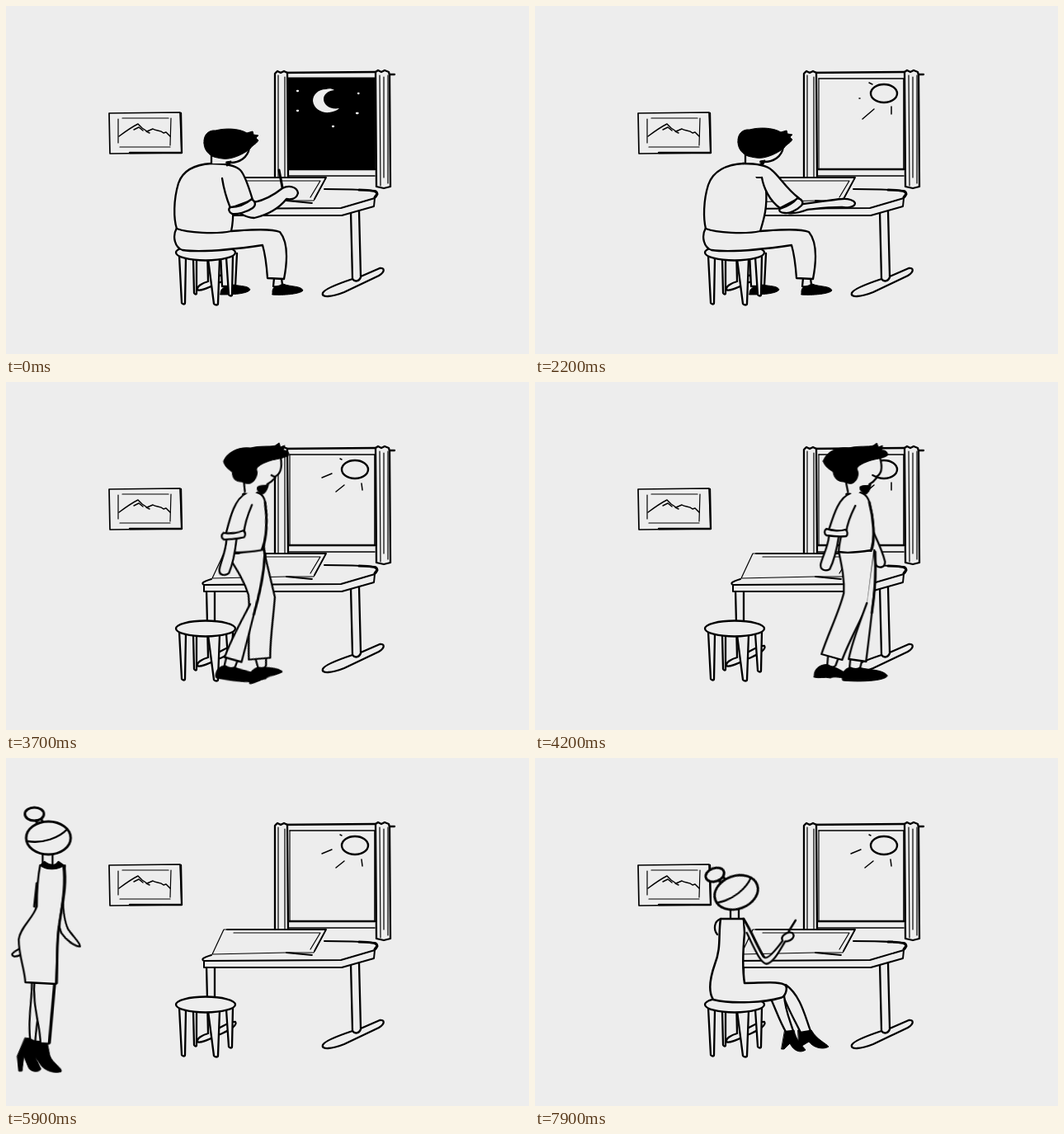
Write an HTML page without scripts that moves like this. It is 634 by 422 pixels and loops after 8 s.

```html
<!DOCTYPE html>
<html lang="en">
<head>
<meta charset="utf-8">
<title>Desk by the window</title>
<style>
html,body{margin:0;width:100%;height:100%;overflow:hidden;background:#ededed}
svg{display:block;width:634px;height:422px}
path,ellipse{fill:#ededed;stroke:#000;stroke-width:2.3;stroke-linecap:round;stroke-linejoin:round}
.n{fill:none}
.t{fill:none;stroke-width:1.2}
.b{stroke-width:3}
.k{fill:#000;stroke-width:1}

/* who is on stage */
.seated,.walker,.visitor,.artist,.night,.day,.pen,.back{animation:8s step-end infinite}
.seated{animation-name:seated}
.walker{animation-name:walker}
.visitor{animation-name:visitor}
.artist{animation-name:artist}
.night{animation-name:night}
.day{animation-name:day}
.back{animation-name:back}
@keyframes seated{0%{visibility:visible}42.5%,100%{visibility:hidden}}
@keyframes walker{0%{visibility:hidden}42.5%{visibility:visible}67%,100%{visibility:hidden}}
@keyframes visitor{0%{visibility:hidden}67.5%{visibility:visible}95%,100%{visibility:hidden}}
@keyframes artist{0%{visibility:hidden}95%,100%{visibility:visible}}
@keyframes night{0%{visibility:visible}6.2%,100%{visibility:hidden}}
@keyframes day{0%{visibility:hidden}6.2%,100%{visibility:visible}}
@keyframes back{0%{visibility:hidden}29.9%{visibility:visible}42.5%,100%{visibility:hidden}}

/* sky */
.moon{animation:moonset 8s linear infinite}
@keyframes moonset{0%,1.2%{transform:none}6.2%,100%{transform:translate(-14px,40px)}}
.sun{animation:sunrise 8s ease-out infinite}
@keyframes sunrise{0%,6.2%{transform:translate(-24px,70px)}11.2%,100%{transform:none}}
.rays{animation:rays 1s step-end infinite}
@keyframes rays{
0%,69%,100%{d:path("M383 116L395 111M400 133L410 125M405 93L407 94M431 123L432 131")}
9.5%{d:path("M392 112L397 111M395 137L411 125M402 93L407 94M432 124L433 129")}
19.5%{d:path("M393 112L394 112M397 137L411 125M405 93L409 95M432 122L432 131")}
40%{d:path("M388 114L396 111M400 133L410 125M405 92L408 94M431 123L432 130")}
}

/* seated man */
.head,.torso,.sleeve,.cuff,.fore,.arm2,.fold{animation:8s ease-in-out infinite}
.head{animation-name:head}
@keyframes head{
0%,2%{transform:none}
10%,27.5%{transform:translate(6px,-1px)}
32%,35%{transform:translate(-3px,-3px)}
38.75%,100%{transform:translate(-8px,0)}
}
.torso{animation-name:torso}
@keyframes torso{
0%,2%{d:path("M249 191C232 192 215 197 209 215C203 235 203 258 207 270C220 275 255 277 273 273C276 260 277 235 270 203")}
10%,27.5%{d:path("M253 191C234 192 216 199 210 217C204 236 204 258 207 270C220 275 255 277 273 273C277 260 282 245 280 222")}
32%,100%{d:path("M241 191C228 194 216 198 212 208C208 232 206 255 207 270C220 275 255 277 276 272C279 255 278 235 277 207")}
}
.sleeve{animation-name:sleeve}
@keyframes sleeve{
0%,2%,14%,20%{d:path("M262 209C264 222 268 235 272 245L299 235C295 222 290 205 284 199C278 193 265 191 249 191")}
10%,11.25%,17%,23.75%,27.5%{d:path("M275 208C277 220 284 236 297 245L320 233C305 222 296 206 287 199C281 193 268 191 252 191")}
32%,35%{d:path("M276 215C290 200 300 180 304 152L284 148C283 165 280 175 274 183C270 188 262 190 245 191")}
38.75%,100%{d:path("M278 208C290 212 302 220 312 226L321 211C312 208 303 205 297 202C287 196 268 191 242 191")}
}
.cuff{animation-name:cuff}
@keyframes cuff{
0%,2%,14%,20%{d:path("M272 244C282 244 292 239 298 234C303 238 303 242 299 245C292 250 280 253 274 252C270 250 269 246 272 244Z")}
10%,11.25%,17%,23.75%,27.5%{d:path("M297 246C306 243 314 238 318 233C324 234 326 239 323 242C317 248 308 252 303 251C297 251 295 248 297 246Z")}
32%,35%{d:path("M304 152C298 154 290 152 284 149C281 146 281 141 285 140C292 139 300 141 305 143C309 146 308 151 304 152Z")}
38.75%,100%{d:path("M312 226C316 222 320 214 319 210C323 209 327 212 326 216C325 222 322 226 320 227C316 229 312 228 312 226Z")}
}
.fore{animation-name:fore}
@keyframes fore{
0%,2%,14%,20%{d:path("M301 238C315 235 325 229 335 221C343 217 353 219 354 227C352 234 346 235 340 234C332 244 318 253 301 257C295 257 288 254 283 251")}
10%,11.25%,17%,23.75%,27.5%{d:path("M325 240C345 238 358 235 372 234C380 233 387 236 388 239C388 244 378 245 372 244C355 244 340 246 330 247C322 250 314 252 307 251")}
32%,35%{d:path("M287 141C283 120 279 105 277 92C272 84 272 72 278 71C285 72 288 80 287 90C292 105 298 120 300 130C301 135 302 138 302 142")}
38.75%,100%{d:path("M324 212C328 210 331 206 334 203C340 200 354 199 357 203C356 207 350 207 345 209C340 212 334 218 330 221C327 224 324 226 320 227")}
}
.arm2{animation-name:arm2}
@keyframes arm2{
0%,29.9%{d:path("M241 191C228 190 216 194 211 199C205 203 202 208 203 214C205 222 206 226 207 232")}
32%,35%{d:path("M241 191C232 185 228 165 229 142C230 115 232 72 222 72C212 74 208 160 207 222")}
38.75%,100%{d:path("M241 191C225 193 208 194 196 199C186 201 182 207 187 212C193 217 203 217 211 213")}
}
.fold{animation-name:fold}
@keyframes fold{
0%,29.9%{d:path("M212 210C211 214 211 218 210 222")}
32%,35%{d:path("M229 142C222 147 216 146 211 143")}
38.75%,100%{d:path("M187 207C194 211 204 209 213 206")}
}
.pen{animation-name:pen;animation-timing-function:ease-in-out}
@keyframes pen{
0%,2%,14%,20%{transform:none;visibility:visible}
10%,11.25%,17%{transform:translate(26px,10px)}
23.7%{transform:translate(26px,10px);visibility:visible}
23.8%,100%{transform:translate(26px,10px);visibility:hidden}
}

/* walking man */
.stroll{animation:stroll 8s linear infinite}
@keyframes stroll{
0%,42.5%{transform:translate(-108px,2px)}
46.25%{transform:translate(-98px,0)}
52.5%{transform:none}
62.5%{transform:translate(270px,0)}
67%,100%{transform:translate(390px,0)}
}
.legA,.legB,.swingA,.swingB,.lean{animation:1.6s ease-in-out -.6s infinite}
.legA,.legB,.lean{transform-origin:388px 208px}
.legA{animation-name:stepA}
.legB{animation-name:stepB}
.lean{animation-name:lean}
.swingA{transform-origin:381px 142px;animation-name:swingA}
.swingB{transform-origin:402px 150px;animation-name:swingB}
@keyframes stepA{25%{transform:rotate(-26deg)}50%{transform:rotate(4deg)}75%{transform:rotate(-24deg)}}
@keyframes stepB{25%{transform:rotate(14deg)}50%{transform:rotate(-22deg)}75%{transform:rotate(12deg)}}
@keyframes lean{50%{transform:skewX(-9deg)}}
@keyframes swingA{25%,75%{transform:rotate(-12deg)}50%{transform:rotate(10deg) scale(1.18)}}
@keyframes swingB{25%,75%{transform:rotate(12deg)}50%{transform:rotate(-14deg)}}

/* visitor */
.enter{animation:enter 8s linear infinite}
@keyframes enter{
0%,68%{transform:translate(-275px,0)}
78.75%,91.25%{transform:none}
95%,100%{transform:translate(42px,0)}
}
.paceA,.paceB{animation:paceA 8s ease-in-out infinite;transform-origin:172px 255px}
.paceB{animation-name:paceB}
@keyframes paceA{0%,68%,73%,78%,91.25%,100%{transform:none}70.5%,75.5%{transform:rotate(-17deg)}93%{transform:rotate(-9deg)}}
@keyframes paceB{0%,68%,73%,78%,91.25%,100%{transform:none}70.5%,75.5%{transform:rotate(15deg)}93%{transform:rotate(7deg)}}
.armL{animation:armL 8s ease-in-out infinite;transform-origin:170px 132px}
.armR{animation:armR 8s ease-in-out infinite;transform-origin:198px 132px}
@keyframes armL{0%,75%{transform:rotate(-26deg)}78.75%,84%,91%{transform:none}81%,87.5%{transform:rotate(4deg)}95%,100%{transform:rotate(-20deg)}}
@keyframes armR{0%,75%{transform:rotate(30deg)}78.75%,84%,91%{transform:none}81%,87.5%{transform:rotate(-5deg)}95%,100%{transform:rotate(10deg)}}
.nod{animation:nod 8s ease-in-out infinite;transform-origin:178px 122px}
@keyframes nod{0%,79%,84%,91%,100%{transform:none}81.5%,87.5%{transform:rotate(3deg)}}
.sketch{animation:sketch .4s ease-in-out -.3s infinite;transform-origin:254px 200px}
@keyframes sketch{50%{transform:rotate(-3deg)}}
</style>
</head>
<body>
<svg viewBox="0 0 634 422" xmlns="http://www.w3.org/2000/svg">
<defs>
<clipPath id="pane"><path d="M343 88H447V198H343Z"/></clipPath>
<g id="face">
<ellipse cx="162" cy="68" rx="11.5" ry="8" class="b"/>
<path class="n b" d="M164 76L166 80M171 75L172 79"/>
<ellipse cx="179" cy="97" rx="27" ry="20" class="b"/>
<path class="n" d="M154 101C172 104 192 97 202 86"/>
</g>
</defs>

<!-- picture -->
<path style="stroke-width:1.7" d="M125 130L211 129L213 178L126 179Z"/>
<path class="n" d="M212 130L213 178L150 178"/>
<path class="t" d="M136 137V166M141 136H197M200 136L199 169M138 171H199"/>
<path class="n" style="stroke-width:1.5" d="M137 158C145 152 154 146 160 143L165 148L171 152L178 149C182 152 187 150 191 154L194 153L199 158M155 150L161 147L166 151M170 152L174 154"/>

<!-- window -->
<path class="n" d="M327 81L448 80"/>
<path class="n" style="stroke-width:1.6" d="M344 88H447V197"/>
<g class="night">
<path class="k" d="M341 87H447V198H341Z"/>
<g clip-path="url(#pane)"><path class="moon" style="stroke:none" d="M388 101C378 101 372 108 372 115C373 125 383 130 392 129C397 128 401 127 404 124C393 126 385 120 385 113C385 107 390 103 398 102C395 100 391 100 388 101Z"/></g>
<path d="M353 103h1M427 106h.5M353 127h1M425 130h1.5M396 146h1" style="stroke:#ededed"/>
</g>
<g class="day">
<path class="t" d="M344 88V197"/>
<g clip-path="url(#pane)"><ellipse class="sun" cx="423" cy="106" rx="16" ry="11" style="stroke-width:2.4"/></g>
<path class="rays n" style="stroke-width:1.5" d="M383 116L395 111M400 133L410 125M405 93L407 94M431 123L432 131"/>
</g>
<path class="n" style="stroke-width:2.6" d="M342 198H447"/>
<path class="n" style="stroke-width:1.6" d="M342 206H447"/>
<path d="M326 210V82L329 79L333 81L337 79L341 81L342 208"/>
<path class="t" d="M330 84V207M338 86V207"/>
<path d="M448 80L451 78L455 80L459 78L464 80L465 84L466 219L458 221L449 219Z"/>
<path class="t" d="M453 84L454 218M458 86V208M463 84V215"/>
<path class="n" d="M465 83H471"/>

<!-- table -->
<path d="M243 252L245 334C238 336 231 340 232 344C236 347 250 339 262 334C271 330 281 324 278 320C272 319 262 326 253 330L253 252"/>
<path d="M418 250L420 331C405 336 386 343 384 348C382 354 395 353 410 347L452 327C460 322 459 317 453 318L430 328L428 249"/>
<path class="n" d="M420 331C423 335 428 334 430 329"/>
<path d="M239 245L240 254L407 254L447 243L450 226L446 224L370 222L250 238L238 243Z" style="stroke:none"/>
<path class="n" style="stroke-width:2" d="M240 246V254H407L446 243L447 233M386 222C410 222 435 223 447 224C451 225 451 229 447 233L406 245L240 246C236 244 239 242 249 239"/>
<path class="n b" d="M428 223C440 223 450 224 450 228L447 232"/>
<path class="t" style="fill:#ededed" d="M264 208H388L373 236L340 236L250 238Z"/>
<path class="n" style="stroke-width:1.8" d="M268 208H388L374 234M340 236L371 239"/>
<path class="t" d="M276 212H381L369 232"/>

<!-- far shin, stool -->
<g class="seated">
<path d="M260 300L262 340H278L280 300"/>
<path class="k" d="M260 348C260 340 270 340 276 338C284 340 294 339 296 344C292 350 268 350 260 350Z"/>
</g>
<path d="M227 307L228 348C229 350 231 350 231 348V307"/>
<path d="M267 305L270 350C271 352 274 352 274 350L275 302"/>
<path d="M210 303L213 360C214 362 217 362 217 360L218 306"/>
<path d="M245 307L252 361C253 363 257 363 257 361L259 306"/>
<ellipse cx="242" cy="299" rx="36" ry="9.5"/>

<!-- seated man -->
<g class="seated">
<path class="k" d="M323 348C322 339 330 339 336 337C345 341 358 339 360 345C356 350 330 351 323 350Z"/>
<path d="M325 330L324 340C328 341 332 340 335 338L334 330"/>
<path d="M207 269C201 280 205 293 214 296C235 299 270 296 311 290C314 300 316 316 317 330L337 331C342 305 341 285 332 274C320 269 290 272 273 273"/>
<path class="torso" d="M249 191C232 192 215 197 209 215C203 235 203 258 207 270C220 275 255 277 273 273C276 260 277 235 270 203"/>
</g>
<g class="back">
<path class="arm2"/>
<path class="fold n"/>
</g>
<g class="seated">
<path class="fore"/>
<path class="sleeve"/>
<path class="cuff"/>
<g class="head">
<path d="M249 178V191L268 191L272 190C283 190 293 184 295 173" style="stroke:none"/>
<path class="n" d="M249 178V191M272 190C283 190 293 184 295 172"/>
<path class="k" d="M267 189L273 188L271 193L268 194Z"/>
<path class="k" d="M240 166C239 156 246 150 254 151C265 148 282 148 292 154L299 152L300 156L306 157L303 160L306 163C303 168 298 169 296 173C288 180 272 187 262 185C254 184 248 182 247 180C243 177 240 172 240 166Z"/>
</g>
</g>
<path class="pen n b" d="M331 199L335 220"/>

<!-- walking man -->
<g class="walker"><g class="stroll">
<g class="lean"><path class="swingB" d="M409 180C416 195 421 205 424 218C424 226 416 226 413 222C410 215 408 208 405 200"/></g>
<g class="legA">
<path class="k" d="M338 356C338 346 348 341 357 343C367 348 378 352 380 358C372 360 362 356 358 359C350 357 345 360 338 358Z"/>
<path d="M355 331L354 343C358 346 362 346 364 344L367 336"/>
<path d="M368 206C372 225 375 240 374 256C368 280 355 305 347 330L372 337C380 315 393 292 403 270L411 206"/>
</g>
<g class="legB">
<path class="k" d="M372 360C371 348 380 345 390 345C400 350 420 347 427 356C425 363 390 364 373 362Z"/>
<path d="M382 336L381 346C386 349 392 349 394 346L396 338"/>
<path d="M402 268C394 290 384 315 380 336L401 339C404 315 407 290 410 262C413 245 413 225 411 204"/>
<path class="n b" d="M412 206C413 230 412 255 408 280"/>
</g>
<g class="lean">
<path d="M377 136L383 133C398 132 404 138 406 150C411 170 411 190 407 204C395 206 380 208 368 206C368 196 371 188 372 180"/>
<path class="n b" d="M405 146C410 165 412 190 408 203"/>
<g class="swingA">
<path d="M356 187C355 200 348 212 346 221C345 228 352 230 357 227C363 215 366 200 368 187"/>
<path d="M382 135C368 140 362 160 356 179L377 182C378 172 384 158 388 150"/>
<path d="M353 178C360 181 370 181 376 179C379 181 379 185 377 187C369 188 360 187 353 186C350 184 350 180 353 178Z"/>
</g>
<path d="M376 118L378 134L391 136L398 128C406 126 412 122 414 116C420 112 421 103 418 92L385 95Z" style="stroke:none"/>
<path class="n" d="M376 118L379 133M418 92C421 103 420 112 413 115L409 113M414 116C411 120 409 122 405 124"/>
<path class="k" d="M394 127C398 124 402 127 407 124C406 131 403 137 399 136C396 133 392 131 394 127Z"/>
<path class="k" d="M349 96C352 86 364 78 380 80C392 77 404 79 410 77L414 74L416 79L421 77L420 83C425 82 428 86 427 89C422 93 412 93 404 96C396 99 390 102 390 106C393 110 391 119 386 122C382 125 377 122 374 121C366 121 362 116 361 109C357 106 351 103 349 96Z"/>
</g>
</g></g>

<!-- visitor -->
<g class="visitor"><g class="enter">
<g class="paceA">
<path class="k" d="M146 338L157 340L158 365L163 377C160 381 150 380 148 374L143 360L140 378H136L135 360Z"/>
<path d="M158 268C158 290 150 315 152 340L158 344C160 320 168 300 168 268"/>
</g>
<g class="paceB">
<path class="k" d="M160 343L182 344L186 360C190 370 202 374 201 379C195 382 180 380 174 370L168 362L166 378H164L162 358Z"/>
<path d="M163 268C161 300 173 325 174 346L184 346L187 268"/>
<path class="n b" d="M188 268L185 345"/>
</g>
<path d="M172 114V130H184V114"/>
<path class="armL" d="M170 131C160 145 140 185 118 207C110 212 96 208 92 212C90 218 105 218 112 216C125 208 145 192 153 178C160 165 165 155 168 145"/>
<path class="armR" d="M198 130C205 150 225 185 240 195C250 200 262 202 263 206C258 209 245 208 235 203C222 192 210 175 198 152"/>
<path d="M169 130C166 145 165 160 165 180C160 195 145 205 143 220C143 240 150 255 151 272L188 274C190 240 189 220 192 203C195 180 200 155 197 131"/>
<path class="n b" d="M189 273C190 240 189 220 192 203C195 180 202 155 198 131M165 152L162 180"/>
<path class="k" d="M169 130L174 125C182 131 187 131 191 125L198 130C192 136 175 137 169 130Z"/>
<use class="nod" href="#face"/>
</g></g>

<!-- seated artist -->
<g class="artist">
<path class="k" d="M303 330L314 330C316 342 325 350 328 354C322 358 314 356 309 346L302 353H299Z"/>
<path class="k" d="M319 330L335 330C342 342 353 346 356 350C350 354 338 352 332 344L322 350L320 349Z"/>
<path d="M298 280C304 300 316 320 322 333L334 331C327 312 322 288 304 275"/>
<path d="M285 290C292 305 296 318 304 332L313 331C309 318 303 305 302 288"/>
<path d="M225 195C217 198 216 208 221 214"/>
<path d="M237 180V196H247V180"/>
<path style="stroke-width:2.5" d="M225 195C222 215 226 230 218 250C211 270 211 285 216 293C240 299 280 296 297 291C304 290 306 280 304 276C298 270 275 273 254 273C251 255 252 235 254 212L253 195Z"/>
<g class="sketch">
<path class="n" style="stroke-width:2.6" d="M307 213L316 200"/>
<path d="M253 195C262 210 270 235 276 243C280 246 290 235 299 224C296 218 305 213 311 215C315 219 311 225 302 225C295 235 287 250 278 251C270 250 262 225 256 212"/>
<path class="n b" d="M253 195C262 210 268 230 275 242"/>
</g>
<use href="#face" transform="translate(65 66) rotate(-20 179 97)"/>
</g>
</svg>
</body>
</html>
```
